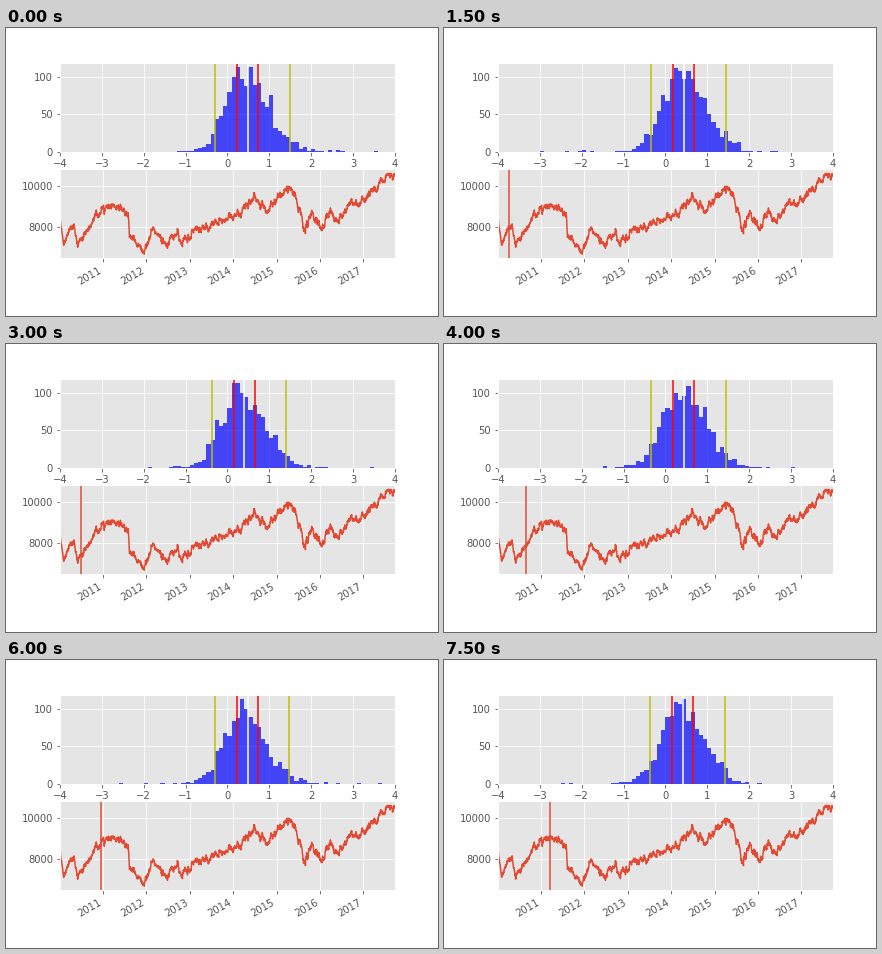
These frames come from a looping animation (432x288 px, 8000 ms). A matplotlib script:

```python
import numpy as np
import matplotlib.pyplot as plt
from matplotlib.animation import FuncAnimation

plt.style.use("ggplot")
plt.rcParams.update({"font.family": "DejaVu Sans", "font.size": 10})

STEPS, STEP_MS = 16, 500
BIN = 0.1
EDGES = np.arange(-40, 40) * BIN
MAX_COUNT = 113

# Offsets of the 5, 33, 50, 66 and 95 % lines from the median
OFFSETS = np.array([-0.78, -0.25, 0, 0.25, 1.0])
LINE_COLORS = ["y", "r", "w", "r", "y"]

EPOCH = np.datetime64("2010-01-01")
FIRST_DAY, LAST_DAY = 3, 2821  # days since EPOCH

# Main turning points of the index: year, level
TURNS = [
    (2010.01, 8350), (2010.08, 7350), (2010.33, 8100), (2010.40, 7150),
    (2011.00, 9000), (2011.35, 8950), (2011.58, 8600), (2011.61, 7600),
    (2011.95, 6850), (2012.16, 8050), (2012.43, 7100), (2012.71, 7650),
    (2012.82, 7150), (2013.15, 7900), (2013.65, 8150), (2014.07, 8550),
    (2014.48, 9450), (2014.76, 8800), (2015.10, 9550), (2015.34, 9850),
    (2015.57, 8700), (2015.64, 7650), (2015.80, 8700), (2016.05, 7850),
    (2016.24, 8700), (2016.40, 8200), (2016.67, 9150), (2017.00, 9300),
    (2017.50, 10400), (2017.73, 10450),
]


def median(k):
    return 0.445 + 0.045 * np.cos(2 * np.pi * k / 11)


def heights(k):
    """Noisy counts of a right-skewed bell with thin, long tails."""
    d = EDGES + BIN / 2 - (median(k) - 0.1)
    width = np.where(d < 0, 0.42, 0.57)
    expected = 97 * np.exp(-0.5 * (d / width) ** 2) + 6 * np.exp(-np.abs(d) / 0.7)
    counts = np.random.default_rng(40 + k).poisson(expected)
    return np.minimum(counts, MAX_COUNT)


def index_series(n=1900):
    """Straight runs between turning points plus mean-reverting noise."""
    rng = np.random.default_rng(7)
    days = np.linspace(FIRST_DAY, LAST_DAY, n)
    noise = np.zeros(n)
    for i, shock in enumerate(rng.normal(0, 65, n - 1), 1):
        noise[i] = 0.8 * noise[i - 1] + shock
    years, levels = zip(*TURNS)
    level = np.interp(2010 + days / 365.25, years, levels) + noise
    return days, np.clip(level, 6640, 10610)


def cursor_day(k):
    return 10 + 28.5 * k


fig, (top, low) = plt.subplots(2, 1, figsize=(6, 4), dpi=72)
fig.subplots_adjust(left=0.125, right=0.9, bottom=0.2, top=0.88, hspace=0.2)

bars = top.bar(EDGES, heights(0), width=BIN, align="edge",
               color="blue", alpha=0.7, linewidth=0)
marks = [top.axvline(0, color=c, linewidth=1.5) for c in LINE_COLORS]
top.set(xlim=(-4, 4), ylim=(0, 1.05 * MAX_COUNT),
        xticks=range(-4, 5), yticks=[0, 50, 100])

low.plot(*index_series(), color="#E24A33", linewidth=1.5)
low.set(xlim=(FIRST_DAY, LAST_DAY), ylim=(6432, 10810), yticks=[8000, 10000])
new_years = np.arange("2011", "2018", dtype="datetime64[Y]")
ticks = (new_years.astype("datetime64[D]") - EPOCH).astype(int)
low.set_xticks(ticks, new_years.astype(str), rotation=30, ha="right")
cursor = low.axvline(FIRST_DAY, color="#E24A33", linewidth=1.5)


def draw(k):
    for bar, h in zip(bars, heights(k)):
        bar.set_height(h)
    for mark, x in zip(marks, median(k) + OFFSETS):
        mark.set_xdata([x, x])
    cursor.set_xdata([cursor_day(k)] * 2)
    cursor.set_visible(k > 0)
    return [*bars, *marks, cursor]


anim = FuncAnimation(fig, draw, frames=STEPS, interval=STEP_MS,
                     repeat=True, repeat_delay=0, blit=False)
plt.show()
```
